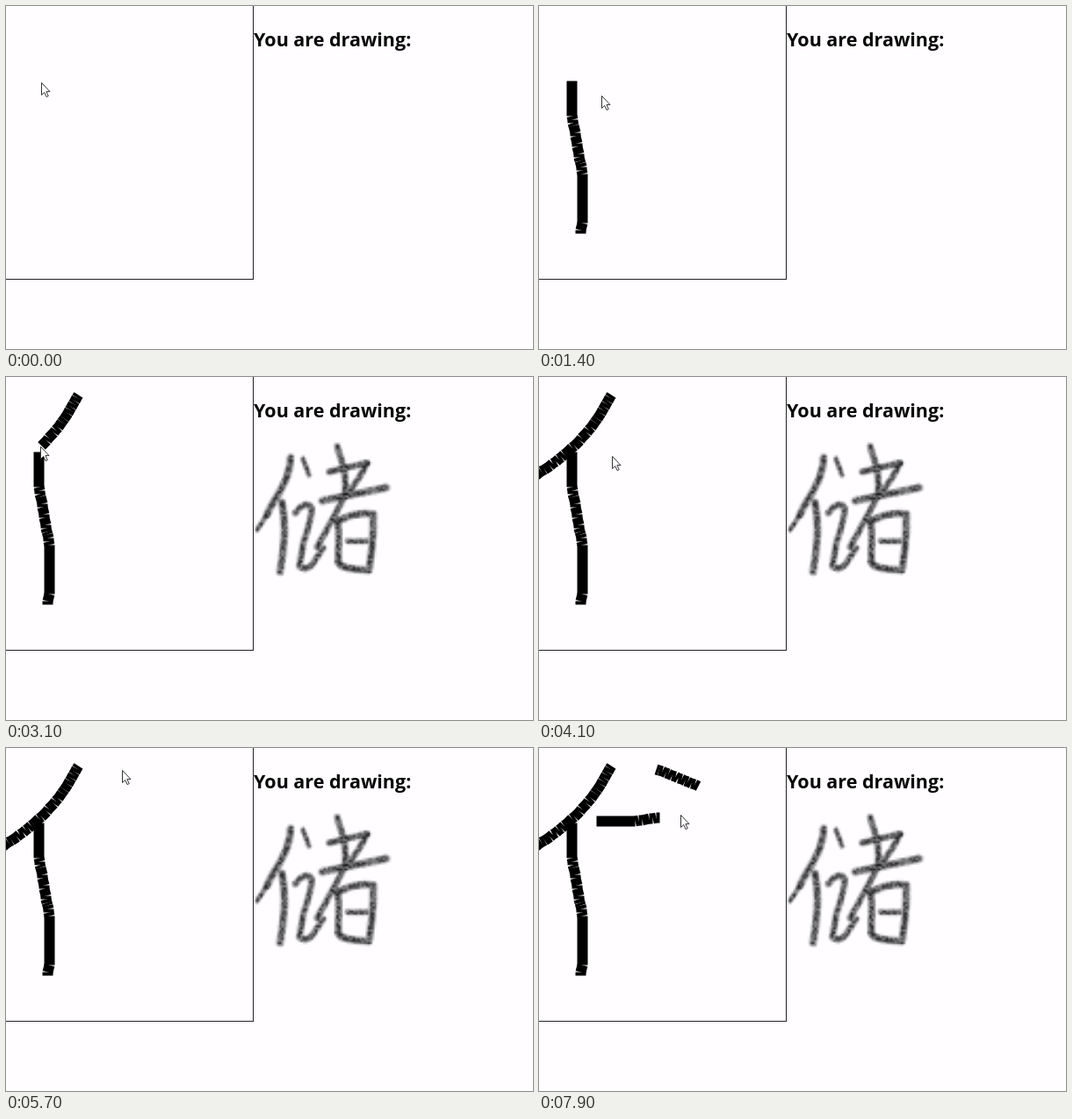
Recreate the animation shown at these times as an HTML page with a canvas. Size 600 by 391 pixels, loop 8000 ms.

```html
<!DOCTYPE html>
<html lang="en">
<head>
<meta charset="utf-8">
<title>Drawing pad</title>
<style>
  html, body { margin: 0; width: 100%; height: 100%; overflow: hidden; background: #fffdff; }
  body { position: relative; }
  canvas { position: absolute; left: 0; top: 0; }
  .pad { position: absolute; left: -2px; top: -2px; width: 283px; height: 313px;
         border: solid #222; border-width: 0 1px 1px 0; }
  h1 { position: absolute; left: 282px; top: 23px; margin: 0; white-space: nowrap; color: #080808;
       font: 700 21.5px/30px "Open Sans", "Noto Sans", sans-serif; }
</style>
</head>
<body>
<div class="pad"></div>
<h1>You are drawing:</h1>
<canvas id="stage" width="600" height="391"></canvas>
<script>
const LOOP = 8000, STEP = 100, GLYPH_AT = 1600;
const ctx = document.getElementById('stage').getContext('2d');
const easeOut = k => 1 - (1 - k) ** 2;
const linear = k => k;

// The pointer's journey: hops with the pen up, ink with the pen down.
const moves = [];
let hand = { x: 41, y: 87 };

function addMove(from, to, d, ease, dots) {
  const path = document.createElementNS('http://www.w3.org/2000/svg', 'path');
  path.setAttribute('d', d);
  const length = path.getTotalLength();
  const at = k => path.getPointAtLength(length * k);
  hand = at(1);
  moves.push({ from, to, at, ease, dots: dots ? sample(at, length) : [] });
}

const hop = (from, to, x, y) => addMove(from, to, `M${hand.x} ${hand.y}L${x} ${y}`, easeOut);
const ink = (from, to, d) => addMove(from, to, d, linear, true);

// Mouse samples land on whole pixels, which makes slanted lines shaky.
function sample(at, length) {
  const count = Math.round(length / 4);
  const snap = v => Math.floor(v) + 0.5;
  return Array.from({ length: count + 1 }, (_, i) => {
    const p = at(i / count);
    return { x: snap(p.x), y: snap(p.y) };
  });
}

hop(0, 100, 38, 85);
ink(300, 800, 'M37.5 85.5V125L49.5 192V246L47 259');
hop(800, 1400, 72, 102);
hop(1500, 2200, 71, 17);
hop(2400, 2700, 81, 21);
ink(2700, 3400, 'M82 20Q56 76 -4 112');
hop(3600, 4100, 84, 90);
hop(4100, 4500, 117, 66);
hop(5000, 5700, 133, 25);
ink(5830, 6000, 'M133 24L181 43');
hop(6200, 6400, 99, 78);
hop(6500, 7000, 77, 81);
hop(7100, 7500, 66, 82);
ink(7600, 7800, 'M65.5 83.5H110L137 79');
hop(7800, 7900, 162, 76);

// Every change of direction starts a new butt-ended line, leaving thin cracks.
function drawInk(dots, progress) {
  const last = Math.floor((dots.length - 1) * progress);
  let dx, dy;
  ctx.beginPath();
  for (let i = 1; i <= last; i++) {
    const a = dots[i - 1], b = dots[i];
    const turned = dx * (b.y - a.y) !== dy * (b.x - a.x);
    dx = b.x - a.x;
    dy = b.y - a.y;
    if (turned) {
      ctx.stroke();
      ctx.beginPath();
      ctx.moveTo(a.x, a.y);
    }
    ctx.lineTo(b.x, b.y);
  }
  ctx.stroke();
}

const arrow = new Path2D('M-.5 .5V14.5L2.7 11.5L5.1 16.6L7.2 15.6L4.9 10.6H9Z');
function drawPointer({ x, y }) {
  ctx.save();
  ctx.translate(Math.round(x), Math.round(y));
  ctx.fillStyle = '#fff';
  ctx.strokeStyle = '#333';
  ctx.lineWidth = 1;
  ctx.fill(arrow);
  ctx.stroke(arrow);
  ctx.restore();
}

// The recognised character: a small grainy bitmap, enlarged smoothly.
function makeGlyph() {
  const cell = 2.4, size = 68;
  const small = document.createElement('canvas');
  small.width = small.height = size;
  const g = small.getContext('2d');
  g.scale(1 / cell, 1 / cell);
  g.translate(-280, -70);
  g.lineCap = g.lineJoin = 'round';
  const brush = (width, d) => {
    const path = new Path2D(d);
    for (const [share, alpha] of [[1, 0.5], [0.6, 0.8]]) {
      g.lineWidth = width * share;
      g.strokeStyle = `rgba(12,12,14,${alpha})`;
      g.stroke(path);
    }
  };
  // Person radical
  brush(9, 'M324 92Q323 112 312 130T297 157');
  brush(6, 'M297 157L286 174');
  brush(9, 'M314 143Q321 173 312 222');
  // Speech radical
  brush(6, 'M338 93L345 112');
  brush(8, 'M329 155Q341 140 348 149Q348 162 339 187L334 216Q345 223 353 207L361 195');
  // Right half
  brush(8, 'M377 79L381 92Q388 110 386 133');
  brush(8, 'M368 108L411 98');
  brush(9, 'M360 141L433 126');
  brush(8, 'M411 98Q401 120 386 135Q373 161 354 194');
  brush(9, 'M378 164Q380 190 378 211Q381 219 412 220');
  brush(9, 'M378 164Q398 153 418 156Q419 185 413 220');
  brush(7, 'M389 187H411');

  let seed = 11;
  const random = () => (seed = seed * 16807 % 2147483647) / 2147483647;
  g.setTransform(1, 0, 0, 1, 0, 0);
  g.globalCompositeOperation = 'destination-out';
  for (let i = 0; i < size * size; i++) {
    g.fillStyle = `rgba(0,0,0,${random() * 0.45})`;
    g.fillRect(i % size, Math.floor(i / size), 1, 1);
  }
  return { small, extent: size * cell };
}
const glyph = makeGlyph();

function render(now) {
  const time = Math.floor(now % LOOP / STEP) * STEP;
  let pointer;
  ctx.clearRect(0, 0, 600, 391);
  ctx.lineWidth = 12;
  ctx.strokeStyle = '#000';
  for (const { from, to, at, ease, dots } of moves) {
    if (time < from) break;
    const progress = ease(Math.min(1, (time - from) / (to - from)));
    pointer = at(progress);
    drawInk(dots, progress);
  }
  if (time >= GLYPH_AT) ctx.drawImage(glyph.small, 280, 70, glyph.extent, glyph.extent);
  drawPointer(pointer);
}

const start = performance.now();
function tick() {
  render(performance.now() - start);
  requestAnimationFrame(tick);
}
tick();
</script>
</body>
</html>
```
